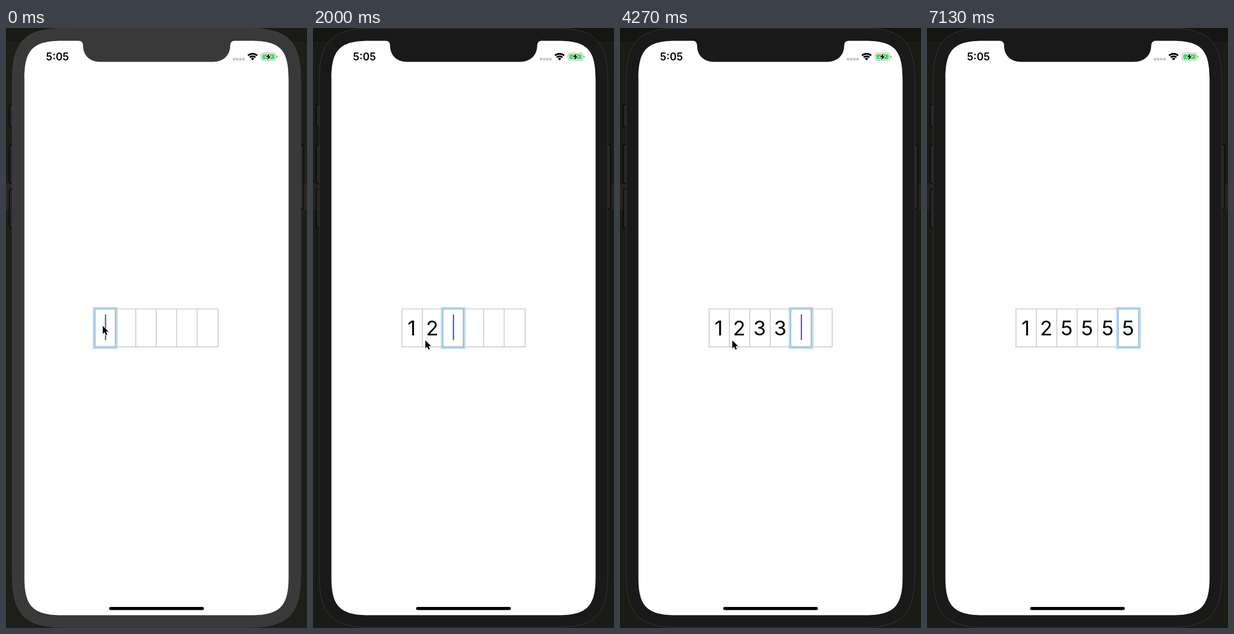
These frames come from a looping animation (531 by 1054 pixels, 7.94 s). An HTML page:

```html
<!DOCTYPE html>
<html lang="en">
<head>
<meta charset="utf-8">
<title>Code input</title>
<style>
  html, body { margin: 0; width: 100%; height: 100%; overflow: hidden; background: #1e1f18; }
  svg { display: block; width: 531px; height: 1054px; }
  text { font-family: Inter, "Liberation Sans", sans-serif; text-anchor: middle; }
  .time { font-size: 18.4px; font-weight: 600; }
  .digits { font-size: 36px; }
  .body { fill: #393939; stroke: #414141; }
  .shade { opacity: 0; }
  .active .body { fill: #191919; stroke: #363636; }
  .active .shade { opacity: .14; }
  .buttons { fill: #262624; stroke: #080808; stroke-width: 1.5; }
  .grid { fill: none; stroke: #bdbdbd; stroke-width: 1.2; }
</style>
</head>
<body>
<svg id="stage" viewBox="0 0 531 1054">
  <rect width="531" height="1054" fill="#1e1f18"/>
  <rect width="531" height="22" fill="#191a14"/>
  <path d="M0 22.5H531" stroke="#12130e"/>
  <rect y="273" width="531" height="46" fill="#2b2823"/>
  <rect class="shade" width="531" height="1054"/>

  <g class="buttons">
    <rect x="6" y="134" width="12" height="39" rx="3"/>
    <rect x="6" y="205" width="12" height="68" rx="3"/>
    <rect x="6" y="283" width="12" height="68" rx="3"/>
    <rect x="512" y="205" width="13" height="113" rx="3"/>
  </g>
  <path class="body" d="M11 94.500C11 22.500 33 .5 105 .5H426C498 .5 520 22.500 520 94.500V959C520 1031 498 1053 426 1053H105C33 1053 11 1031 11 959Z"/>
  <path fill="#fff" d="M32.500 88.500C32.500 38 48 22.500 98.500 22.500H128Q136 22.500 136 31C136 48 148 59.500 166 59.500H365C383 59.500 395.500 48 395.500 31Q395.500 22.500 403.500 22.500H432.500C483 22.500 498.500 38 498.500 88.500V965.500C498.500 1016 483 1031.500 432.500 1031.500H98.500C48 1031.500 32.500 1016 32.500 965.500Z"/>

  <text class="time" x="90.800" y="57">5:05</text>
  <g fill="#c6c6c8">
    <rect x="400" y="52.500" width="4.500" height="4.500" rx="1.300"/>
    <rect x="405.500" y="52.500" width="4.500" height="4.500" rx="1.300"/>
    <rect x="411" y="52.500" width="4.500" height="4.500" rx="1.300"/>
    <rect x="416.500" y="52.500" width="4.500" height="4.500" rx="1.300"/>
  </g>
  <g fill="none" stroke="#000" stroke-width="3">
    <path d="M427 48.400A11.800 11.800 0 0 1 443 48.400"/>
    <path d="M430 51.600A7.400 7.400 0 0 1 440 51.600"/>
    <path fill="#000" stroke="none" d="M432 53.800A4.400 4.400 0 0 1 438 53.800L435 57Z"/>
  </g>
  <rect x="450" y="44" width="26" height="13" rx="3.800" fill="#fff" stroke="#a4a4a6" stroke-width="1.100"/>
  <rect x="452" y="46" width="22" height="9" rx="2.200" fill="#4cd964"/>
  <path d="M477.600 48.400Q480.600 50.500 477.600 52.600Z" fill="#777"/>
  <path d="M464.800 44.600L458.400 51.300H462.200L460.900 56.600L467.300 49.800H463.500Z" stroke="#fff" stroke-width="1.800" paint-order="stroke"/>
  <rect x="182" y="1017" width="167" height="5.500" rx="2.750"/>

  <path class="grid" d="M157 493.500H374.300V560.200H157ZM193 493.500V560M229 493.500V560M265 493.500V560M301 493.500V560M337.200 493.500V560"/>
  <g id="focus">
    <rect x="155" y="492" width="40" height="70" fill="none" stroke="#b9d8ef" stroke-opacity=".93" stroke-width="3.800"/>
    <rect x="157" y="493.700" width="36" height="66.500" fill="none" stroke="#84afd2" stroke-width="1.200"/>
    <rect id="caret" x="174.500" y="503" width="2.200" height="45.500" rx="1.100" fill="#3358de"/>
  </g>
  <g class="digits" id="digits"></g>
  <g id="pointer">
    <g transform="translate(.7 1.200) scale(.86)">
      <path d="M0 0V16.300L3.700 12.900L6.200 18.700L9.100 17.500L6.600 11.800H11.600Z" transform="translate(.3 1.300)" opacity=".2" stroke="#000" stroke-width="2"/>
      <path d="M0 0V16.300L3.700 12.900L6.200 18.700L9.100 17.500L6.600 11.800H11.600Z" stroke="#fff" stroke-width="2" paint-order="stroke"/>
    </g>
  </g>
</svg>
<script>
  const LOOP = 7940, TICK = 200 / 3, PITCH = 36.1;
  const $ = id => document.getElementById(id);

  // Each entry starts at the given tick (15 ticks per second).
  const typed = [
    [0, ""], [25, "1"], [30, "12"], [34, "123"], [40, "1234"], [52, "123"], [54, "12"],
    [61, "123"], [64, "1233"], [69, "123"], [71, "12"], [80, "125"], [84, "1255"],
    [86, "12555"], [89, "125555"]
  ];
  const blink = [
    [0, 1], [5, .7], [6, .3], [7, 0], [12, .35], [13, .75], [14, 1],
    [20, .5], [21, 0], [25, 1], [48, .75], [49, .35], [50, 0], [52, 1]
  ];
  const path = [
    [0, 170, 522], [8, 138, 537], [10, 138, 537], [17, 197.5, 547.5],
    [97, 197.5, 547.5], [101, 489, 111], [102, 489, 111], [107, 510, -26]
  ];

  const cells = Array.from({ length: 6 }, (_, i) => {
    const cell = document.createElementNS("http://www.w3.org/2000/svg", "text");
    cell.setAttribute("x", 174.2 + i * PITCH);
    cell.setAttribute("y", 540);
    return $("digits").appendChild(cell);
  });

  const latest = (list, tick) => list.filter(e => e[0] <= tick).pop()[1];

  function pointerAt(tick) {
    const next = path.findIndex(p => p[0] > tick);
    if (next < 0) return path[path.length - 1].slice(1);
    const [t0, x0, y0] = path[next - 1], [t1, x1, y1] = path[next];
    const u = (tick - t0) / (t1 - t0), e = u * u * (3 - 2 * u);
    return [x0 + (x1 - x0) * e, y0 + (y1 - y0) * e];
  }

  function draw(time) {
    const tick = Math.floor((time % LOOP + 4) / TICK);
    const code = latest(typed, tick);
    const slot = Math.min(code.length, 5);
    cells.forEach((cell, i) => cell.textContent = code[i] || "");
    $("stage").classList.toggle("active", tick >= 18);
    $("focus").setAttribute("transform", `translate(${slot * PITCH})`);
    $("caret").setAttribute("opacity", code.length > 5 ? 0 : latest(blink, tick));
    $("pointer").setAttribute("transform", `translate(${pointerAt(tick)})`);
  }

  const start = performance.now();
  function frame() {
    draw(performance.now() - start);
    requestAnimationFrame(frame);
  }
  frame();
</script>
</body>
</html>
```
